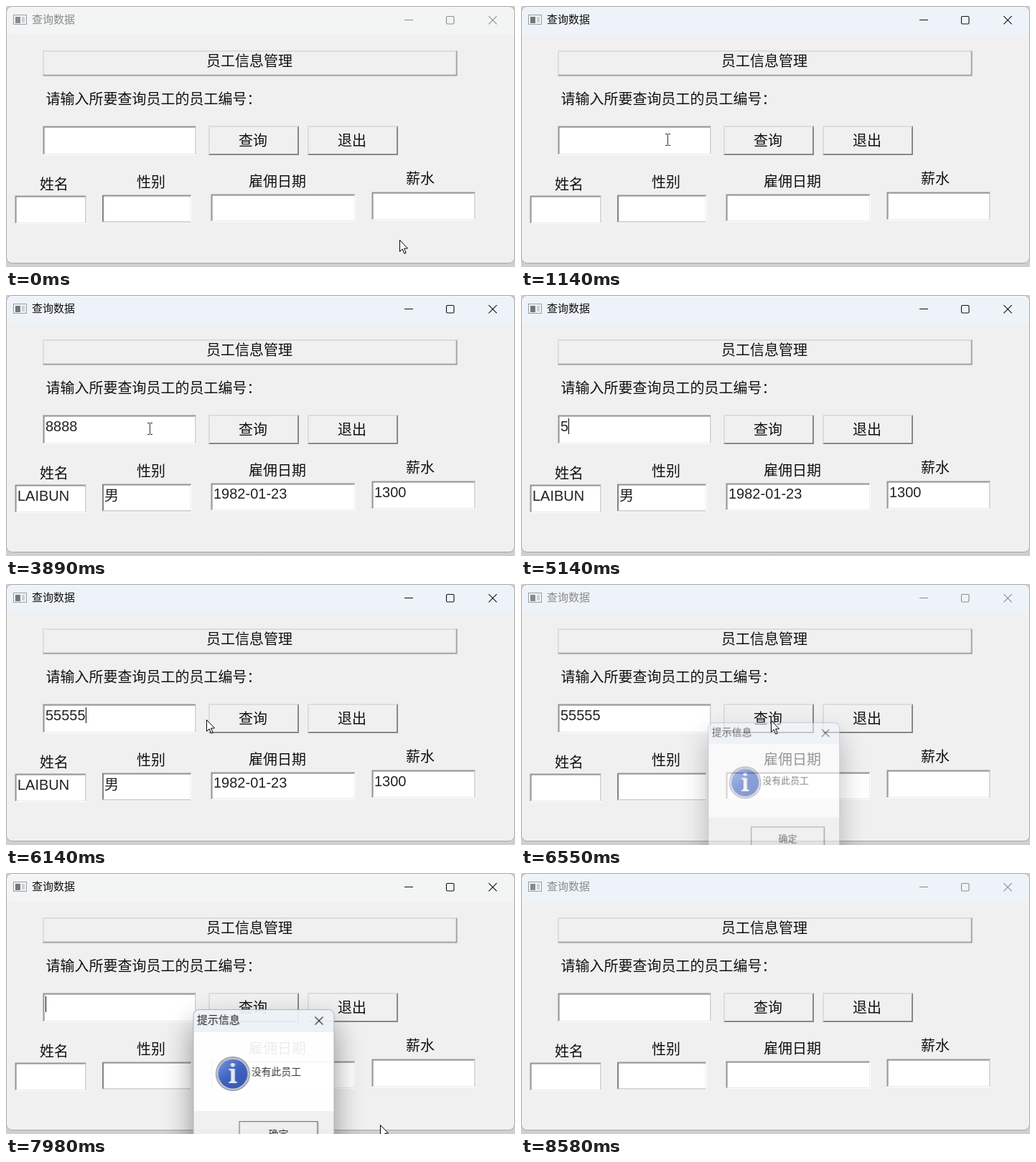
These frames come from a looping animation (709x364 px, 8640 ms). An HTML page with a canvas:

```html
<!DOCTYPE html>
<html lang="zh-CN">
<head>
<meta charset="utf-8">
<title>查询数据</title>
<style>
html, body { margin: 0; width: 100%; height: 100%; overflow: hidden; background: #cfcfcf; }
canvas { display: block; }
</style>
</head>
<body>
<canvas id="stage" width="709" height="364"></canvas>
<script>
const LOOP = 8640;
const CJK = '"Noto Sans CJK SC", "Noto Sans CJK", sans-serif';
const LATIN = '"Liberation Sans", Arial, sans-serif';
const ctx = document.getElementById('stage').getContext('2d');

// Pointer strokes: start, end, steps, target x, target y, upward bend
const MOVES = [
  [70, 740, 10, 204, 186, 0],
  [2530, 3000, 8, 338, 176, 16],
  [3050, 3210, 3, 338, 186, 0],
  [3600, 4080, 6, 152, 186, 0],
  [5730, 6350, 10, 348, 190, 0],
  [6760, 7450, 11, 388, 352, 0],
  [7510, 7640, 2, 389, 362, 0],
  [7980, 7980, 1, 521, 351, 0],
  [8045, 8180, 3, 545, 368, 0]
];
const HIDDEN = [[1800, 2530], [5140, 5730], [7640, 7980], [8180, LOOP]];
const CARET = [[610, 1140], [1670, 3140], [4150, 4680], [5140, 6300], [7980, 8510]];
const ACTIVE = [[610, 6480], [7980, 8510]];
const BAR_LAG = 100;

const within = (t, spans) => spans.some(([a, b]) => t >= a && t < b);
const count = (t, times) => times.filter(x => t >= x).length;

function rect(c, x, y, w, h, color) {
  c.fillStyle = color;
  c.fillRect(x, y, w, h);
}

function text(c, str, x, cy, size, color = '#111', align = 'left', weight = 400) {
  c.font = `${weight} ${size}px ${CJK}`;
  c.textAlign = align;
  c.fillStyle = color;
  c.fillText(str, x, cy + size * 0.38);
}
const label = (str, x, cy) => text(ctx, str, x, cy, 20, '#111', 'left', 300);

function value(str, x, cy, color = '#222') {
  ctx.font = `20px ${LATIN}`;
  ctx.textAlign = 'left';
  ctx.fillStyle = color;
  ctx.fillText(str, x, cy + 7);
}

function path(c, points, close) {
  c.beginPath();
  points.forEach(([x, y], i) => i ? c.lineTo(x, y) : c.moveTo(x, y));
  if (close) c.closePath();
}

// Two-pixel bevel: outer and inner colours for top-left and bottom-right
function bevel(c, x, y, w, h, fill, tl, br) {
  rect(c, x, y, w, h, br[0]);
  rect(c, x, y, w - 1, h - 1, tl[0]);
  rect(c, x + 1, y + 1, w - 2, h - 2, br[1]);
  rect(c, x + 1, y + 1, w - 3, h - 3, tl[1]);
  rect(c, x + 2, y + 2, w - 4, h - 4, fill);
}
const sunken = (x, y, w, h) =>
  bevel(ctx, x + 0.5, y + 0.5, w, h, '#fff', ['#8c8c8c', '#787878'], ['#fff', '#e8e8e8']);
const raised = (c, x, y, w, h) =>
  bevel(c, x + 0.5, y + 0.5, w, h, '#f0f0f0', ['#fff', '#f4f4f4'], ['#848484', '#8c8c8c']);

function cross(c, cx, cy, r, color) {
  c.strokeStyle = color;
  c.lineWidth = 1.1;
  path(c, [[cx - r, cy - r], [cx + r, cy + r]]);
  c.stroke();
  path(c, [[cx + r, cy - r], [cx - r, cy + r]]);
  c.stroke();
}

function drawWindow(t) {
  const active = within(t, ACTIVE);
  const ink = active ? '#111' : '#8b8b8b';
  rect(ctx, 0, 0, 709, 364, '#cfcfcf');
  ctx.beginPath();
  ctx.roundRect(0.5, 0.5, 708, 358, 8);
  ctx.fillStyle = '#f0f0f0';
  ctx.fill();
  ctx.save();
  ctx.clip();
  rect(ctx, 0, 0, 709, 40, within(t - BAR_LAG, ACTIVE) ? '#eef3f9' : '#f3f4f4');
  ctx.restore();
  ctx.strokeStyle = '#a6a6a6';
  ctx.lineWidth = 1;
  ctx.stroke();

  rect(ctx, 10, 12, 19, 14, '#989ca0');
  rect(ctx, 11, 13, 17, 12, '#f4f4f4');
  rect(ctx, 13, 15, 7, 9, active ? '#70787e' : '#858c91');
  rect(ctx, 22, 15, 4, 8, '#cdd1d4');

  text(ctx, '查询数据', 36, 18.5, 15, ink);
  rect(ctx, 555, 19, 12, 1, ink);
  ctx.strokeStyle = ink;
  ctx.lineWidth = 1.1;
  ctx.beginPath();
  ctx.roundRect(613.5, 14.5, 10.5, 10.5, 1.5);
  ctx.stroke();
  cross(ctx, 678, 19.8, 5.6, ink);
}

function drawForm(t) {
  raised(ctx, 51, 62, 577, 35);
  raised(ctx, 282, 167, 125.5, 40.5);
  raised(ctx, 420, 167, 125.5, 40.5);
  label('员工信息管理', 279, 76);
  label('请输入所要查询员工的员工编号：', 55.5, 129);
  label('查询', 324, 187);
  label('退出', 462, 187);
  label('姓名', 47, 248);
  label('性别', 182, 245);
  label('雇佣日期', 338, 244);
  label('薪水', 557, 240);
  sunken(51, 167, 214, 40.5);
  sunken(12, 264, 100, 39.5);
  sunken(133.5, 263, 125, 39);
  sunken(285, 262, 201.5, 38.5);
  sunken(509, 259, 145, 39.5);

  if (t >= 3210 && t < 6480) {
    value('LAIBUN', 16, 280);
    text(ctx, '男', 137, 279, 20, '#222');
    value('1982-01-23', 289, 277);
    value('1300', 513, 275);
  }
}

function drawEntry(t) {
  const typed = t < 5140
    ? '8'.repeat(count(t, [1800, 2000, 2200, 2530]))
    : t < 7980 ? '5'.repeat(count(t, [5140, 5270, 5400, 5530, 5730])) : '';
  const selected = t >= 4150 && t < 5140;
  const width = typed.length * 11.12;
  if (selected) rect(ctx, 55, 171, 45, 24, '#0078d7');
  value(typed, 55, 183, selected ? '#fff' : '#222');
  if (within(t, CARET)) rect(ctx, Math.round(55 + width), 172, 1, 22, '#000');
}

const PAD = 60;
const sheet = document.createElement('canvas');
sheet.width = 197 + 2 * PAD;
sheet.height = 204 + 2 * PAD;

function paintDialog(pressed) {
  const c = sheet.getContext('2d');
  c.clearRect(0, 0, sheet.width, sheet.height);
  c.save();
  c.translate(PAD, PAD);
  c.beginPath();
  c.roundRect(0.5, 0.5, 196, 203, 8);
  c.shadowColor = 'rgba(0,0,0,.46)';
  c.shadowBlur = 42;
  c.shadowOffsetY = 20;
  c.fillStyle = '#f0f0f0';
  c.fill();
  c.shadowColor = 'transparent';
  c.save();
  c.clip();
  rect(c, 0, 0, 197, 32, '#edf2f9');
  rect(c, 0, 32, 197, 110, '#fff');
  c.restore();
  c.strokeStyle = '#a9adb3';
  c.lineWidth = 1;
  c.stroke();

  text(c, '提示信息', 5.5, 14.5, 15);
  cross(c, 175.5, 16, 5.5, '#222');

  const disc = (r, fill) => {
    c.beginPath();
    c.arc(55.5, 90, r, 0, 7);
    c.fillStyle = fill;
    c.fill();
  };
  const blue = c.createLinearGradient(38, 68, 70, 112);
  blue.addColorStop(0, '#6f8fdc');
  blue.addColorStop(0.5, '#3156bd');
  blue.addColorStop(1, '#2a49a8');
  disc(24, '#80858f');
  disc(22.8, '#c3c7d0');
  disc(20.5, blue);
  c.font = 'bold 36px "Noto Serif", "Liberation Serif", serif';
  c.textAlign = 'center';
  c.fillStyle = '#e4e7f0';
  c.fillText('i', 55.5, 103);

  text(c, '没有此员工', 81.5, 87, 13.8, '#222', 'left', 500);
  raised(c, 64, 156, 110, 35);
  c.strokeStyle = pressed ? '#444' : '#777';
  c.strokeRect(64.5, 156.5, 109, 34);
  const shift = pressed ? 1 : 0;
  text(c, '确定', 119 + shift, 174 + shift, 14, '#222', 'center', 500);
  c.restore();
}

function drawDialog(t) {
  if (t < 6480 || t >= 8180) return;
  let scale = 1, top = 183, alpha = 1;
  if (t < 7980) {
    const p = Math.min(1, (t - 6480) / 220);
    scale = 0.9 + 0.1 * p;
    top += 14.7 * (1 - p);
    alpha = Math.sqrt(p);
  } else {
    const p = (t - 7980) / 200;
    top = 190 + 10 * p;
    alpha = 0.93 * (1 - p);
  }
  paintDialog(t >= 7840 && t < 7980);
  ctx.save();
  ctx.globalAlpha = alpha;
  ctx.drawImage(sheet, 260.5 - PAD * scale, top - PAD * scale,
    sheet.width * scale, sheet.height * scale);
  ctx.restore();
}

function pointer(t) {
  let x = 548, y = 326;
  for (const [start, end, steps, tx, ty, bend] of MOVES) {
    if (t < start) break;
    const done = steps < 2 ? 1 : Math.floor((t - start) / (end - start) * (steps - 1) + 0.001) + 1;
    const p = Math.min(1, done / steps);
    const e = p * p * (3 - 2 * p);
    x += (tx - x) * e;
    y += (ty - y) * e - bend * Math.sin(Math.PI * p);
  }
  return [Math.round(x), Math.round(y)];
}

function drawPointer(t) {
  if (within(t, HIDDEN)) return;
  const [x, y] = pointer(t);
  ctx.save();
  ctx.translate(x, y);
  if (x > 52 && x < 264 && y > 168 && y < 207) {
    rect(ctx, 0, -7, 1, 15, '#333');
    for (const edge of [-8, 8]) {
      rect(ctx, -3, edge, 3, 1, '#333');
      rect(ctx, 1, edge, 3, 1, '#333');
    }
  } else {
    path(ctx, [[0.5, 0.5], [0.5, 16.5], [4.2, 13], [6.8, 19.3], [9.2, 18.3], [6.6, 12.2], [11.5, 12]], true);
    ctx.fillStyle = '#fff';
    ctx.fill();
    ctx.strokeStyle = '#000';
    ctx.lineWidth = 1;
    ctx.stroke();
  }
  ctx.restore();
}

const begin = performance.now();
function frame() {
  const t = (performance.now() - begin) % LOOP;
  drawWindow(t);
  drawForm(t);
  drawEntry(t);
  drawDialog(t);
  drawPointer(t);
  requestAnimationFrame(frame);
}
frame();
</script>
</body>
</html>
```
